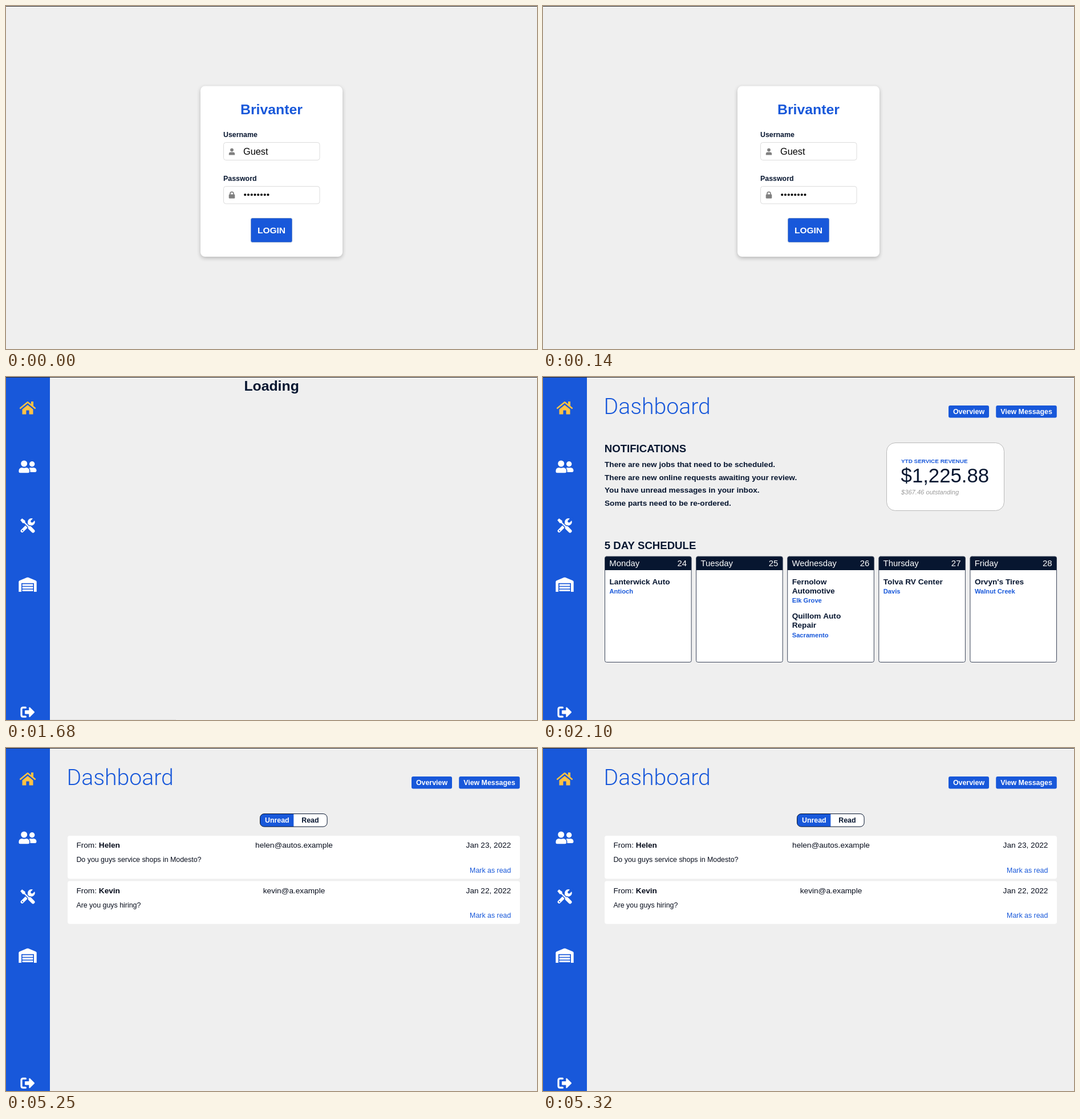
An HTML page with a canvas for the animation above (8000 ms loop, 931 by 602 pixels).

```html
<!DOCTYPE html>
<html lang="en">
<head>
<meta charset="utf-8">
<title>Service dashboard</title>
<style>
  html, body { margin: 0; width: 100%; height: 100%; overflow: hidden; background: #efefef; }
  canvas { display: block; width: 931px; height: 602px; }
</style>
</head>
<body>
<canvas id="stage" width="931" height="602"></canvas>
<script>
const ctx = document.getElementById('stage').getContext('2d');
const LOOP = 8000;
const BLUE = '#1858da', NAVY = '#071630', INK = '#070d1c', PAGE = '#efefef', GOLD = '#ffc244';
const SANS = '"Liberation Sans", Arial, sans-serif';

function text(str, x, y, size, { color = NAVY, style = 'bold', align = 'left', family = SANS } = {}) {
  ctx.font = `${style} ${size}px ${family}`;
  ctx.textAlign = align;
  ctx.fillStyle = color;
  ctx.fillText(str, x, y);
}

function box(x, y, w, h, r, fill, border) {
  ctx.beginPath();
  ctx.roundRect(x, y, w, h, r);
  if (fill) { ctx.fillStyle = fill; ctx.fill(); }
  if (border) { ctx.strokeStyle = border; ctx.lineWidth = 1; ctx.stroke(); }
}

function disc(x, y, r, fill) {
  ctx.beginPath();
  ctx.arc(x, y, r, 0, Math.PI * 2);
  ctx.fillStyle = fill;
  ctx.fill();
}

function shape(path, fill) {
  ctx.fillStyle = fill;
  ctx.fill(new Path2D(path));
}

function line(path, color, width, cap = 'round') {
  ctx.strokeStyle = color;
  ctx.lineWidth = width;
  ctx.lineCap = cap;
  ctx.lineJoin = 'round';
  ctx.stroke(new Path2D(path));
}

function topEdge() {
  ctx.fillStyle = '#2b2b2f';
  ctx.fillRect(0, 0, 931, 1);
}

// Sidebar icons
function house() {
  shape('M38 49 L47.5 56.7 V65.6 H40.6 V58.6 H35.4 V65.6 H28.5 V56.7 Z', GOLD);
  shape('M44 43 H48 V52 L44 49 Z', GOLD);
  line('M25.2 54.8 L38 44.3 L50.8 54.8', GOLD, 2.6);
}

function people() {
  disc(31.7, 152, 5.5, '#fff');
  shape('M28 159 Q31.7 160.6 35.4 159 Q41 159.4 41 165 V166 Q41 168.3 38.7 168.3 H24.7 Q22.4 168.3 22.4 166 V165 Q22.4 159.4 28 159 Z', '#fff');
  disc(45.7, 152.8, 4.7, '#fff');
  shape('M43.4 159 Q45.7 159.8 48 159 Q53.5 159.4 53.5 164.6 Q53.5 166.9 51.2 166.9 H42.5 Q43 162.6 40.6 159.8 Q42 159 43.4 159 Z', '#fff');
}

function tools() {
  line('M28.3 270.2 L40 258.5', '#fff', 5.4);
  disc(44.4, 254.4, 6.3, '#fff');
  line('M45.4 253.4 L52 246.8', BLUE, 4.6, 'butt');
  disc(45.6, 253.2, 2.3, BLUE);
  disc(29, 269.6, 1.2, BLUE);
  line('M31 254 L41 264', BLUE, 5, 'butt');
  line('M41.6 264.6 L47.4 270.4', BLUE, 8.6);
  shape('M25.2 251.2 L28.2 248.2 L33.6 252.3 V256.5 H29.4 Z', '#fff');
  line('M32 255 L41 264', '#fff', 2.4);
  line('M41.8 264.8 L47.4 270.4', '#fff', 6.2);
}

function warehouse() {
  shape('M22.3 377 V359.6 Q22.3 357.9 23.8 357.2 L37 351.8 Q38 351.5 39 351.8 L52.2 357.2 Q53.7 357.9 53.7 359.6 V377 Z', '#fff');
  ctx.fillStyle = BLUE;
  ctx.fillRect(27, 361.8, 22, 15.2);
  for (let i = 0; i < 3; i++) box(28.6, 363.6 + i * 4.7, 18.8, 3.1, 0.3, '#fff');
}

function signOut() {
  line('M34.4 580.2 H30 Q27 580.2 27 583.2 V593.2 Q27 596.2 30 596.2 H34.4', '#fff', 3.2);
  shape('M33 586 Q33 584.9 34.1 584.9 H40.3 V580.6 Q40.6 578.9 42 579.7 L49.8 587.4 Q50.4 588.2 49.8 589 L42 596.8 Q40.6 597.5 40.3 595.8 V591.5 H34.1 Q33 591.5 33 590.4 Z', '#fff');
}

function sidebar() {
  ctx.fillStyle = BLUE;
  ctx.fillRect(0, 0, 77, 602);
  house();
  people();
  tools();
  warehouse();
  signOut();
}

// Scenes
function login() {
  ctx.save();
  ctx.shadowColor = 'rgba(0,0,0,.24)';
  ctx.shadowBlur = 7;
  ctx.shadowOffsetY = 2.5;
  box(341, 140.5, 249, 299.5, 8, '#fff');
  ctx.restore();

  text('Brivanter', 465.5, 189.5, 24.8, { color: BLUE, align: 'center' });
  text('Username', 381, 230, 12.4);
  text('Password', 381, 307, 12.4);
  box(381.5, 239.5, 168.5, 31, 4, '#fff', '#dcdcdc');
  box(381.5, 316.5, 168.5, 30.5, 4, '#fff', '#dcdcdc');

  const grey = '#808080';
  disc(396, 252.6, 2.9, grey);
  shape('M390.8 261.5 V259.8 Q390.8 256.6 394 256.6 H398 Q401.2 256.6 401.2 259.8 V261.5 Z', grey);
  box(390.7, 330.6, 10.6, 7.2, 1.4, grey);
  line('M393 331 V329.3 A3 3 0 0 1 399 329.3 V331', grey, 1.7, 'butt');

  text('Guest', 416, 261, 16.3, { color: '#000', style: 'normal' });
  for (let i = 0; i < 8; i++) disc(419.2 + i * 5.75, 331.2, 2, '#000');

  box(429.5, 372.5, 72, 42, 2.5, BLUE, '#6f8fc8');
  text('LOGIN', 465.5, 398.5, 15.5, { color: '#fff', align: 'center' });
}

function loading() {
  sidebar();
  text('Loading', 465.6, 24.3, 24.8, { align: 'center' });
  ctx.fillStyle = '#dedede';
  ctx.fillRect(77, 601, 221, 1);
}

function header() {
  sidebar();
  text('Dashboard', 106.5, 64.5, 39.2, { color: BLUE, style: '300', family: 'Roboto, sans-serif' });
  const button = (label, x, w) => {
    box(x, 50, w, 21.6, 3, BLUE);
    text(label, x + w / 2, 64.5, 12.4, { color: '#fff', align: 'center' });
  };
  button('Overview', 711, 71);
  button('View Messages', 794.2, 106.6);
}

const NOTICES = [
  'There are new jobs that need to be scheduled.',
  'There are new online requests awaiting your review.',
  'You have unread messages in your inbox.',
  'Some parts need to be re-ordered.'
];

const DAYS = [
  { name: 'Monday', jobs: [{ shop: ['Lanterwick Auto'], city: 'Antioch' }] },
  { name: 'Tuesday', jobs: [] },
  { name: 'Wednesday', jobs: [
    { shop: ['Fernolow', 'Automotive'], city: 'Elk Grove' },
    { shop: ['Quillom Auto', 'Repair'], city: 'Sacramento' }
  ] },
  { name: 'Thursday', jobs: [{ shop: ['Tolva RV Center'], city: 'Davis' }] },
  { name: 'Friday', jobs: [{ shop: ["Orvyn's Tires"], city: 'Walnut Creek' }] }
];

function dayColumn(day, i) {
  const x = 108.5 + i * 160.1, w = 151.6;
  box(x, 315, w, 185.5, 3, '#fff');
  box(x, 315, w, 24, [3, 3, 0, 0], NAVY);
  box(x, 315, w, 185.5, 3, null, '#3c465a');
  text(day.name, x + 7.8, 332.3, 14.88, { color: '#fff', style: 'normal' });
  text(String(24 + i), x + w - 8, 332.3, 14.88, { color: '#fff', style: 'normal', align: 'right' });
  let y = 363.6;
  for (const job of day.jobs) {
    for (const part of job.shop) {
      text(part, x + 8, y, 13.64);
      y += 16.4;
    }
    text(job.city, x + 8, y, 11.16, { color: BLUE });
    y += 27.6;
  }
}

function overview() {
  header();
  text('NOTIFICATIONS', 107.8, 131.8, 18.6);
  NOTICES.forEach((notice, i) => text(notice, 108, 158.2 + i * 22.45, 13.64));

  box(602.5, 115.5, 206, 119, 15, '#fff', '#b9b9b9');
  text('YTD SERVICE REVENUE', 628, 150.5, 9.92, { color: BLUE });
  text('$1,225.88', 627.6, 185, 34.72, { style: 'normal' });
  text('$367.46 outstanding', 628, 206.3, 11.16, { color: '#9a9a9a', style: 'italic' });

  text('5 DAY SCHEDULE', 107.8, 302, 18.6);
  DAYS.forEach(dayColumn);
}

function message(y, h, { name, mail, date, body }) {
  const plain = { color: INK, style: 'normal' };
  const right = { ...plain, align: 'right' };
  box(108, y, 793, h, 4, '#fff');
  text('From: ', 123.4, y + 21, 13.64, plain);
  text(name, 162.8, y + 21, 13.64, { color: INK });
  text(mail, 505, y + 21, 13.64, { ...plain, align: 'center' });
  text(date, 885.4, y + 21, 13.64, right);
  text(body, 123.4, y + 46.4, 12.4, plain);
  text('Mark as read', 885.4, y + h - 10.6, 12.4, { ...right, color: BLUE });
}

function messages() {
  header();
  box(445.5, 115.5, 117.6, 22.6, 7, '#fff');
  box(445.5, 115.5, 58.8, 22.6, [7, 0, 0, 7], BLUE);
  box(445.5, 115.5, 117.6, 22.6, 7, null, NAVY);
  text('Unread', 475.3, 131.2, 12.4, { color: '#fff', align: 'center' });
  text('Read', 533.4, 131.2, 12.4, { align: 'center' });

  message(154, 75.6, {
    name: 'Helen', mail: 'helen@autos.example', date: 'Jan 23, 2022',
    body: 'Do you guys service shops in Modesto?'
  });
  message(233.5, 75.2, {
    name: 'Kevin', mail: 'kevin@a.example', date: 'Jan 22, 2022',
    body: 'Are you guys hiring?'
  });
}

const SCENES = [[5250, messages], [2100, overview], [1680, loading], [0, login]];

function frame(now) {
  const t = now % LOOP;
  ctx.fillStyle = PAGE;
  ctx.fillRect(0, 0, 931, 602);
  SCENES.find(([start]) => t >= start)[1]();
  topEdge();
  requestAnimationFrame(() => frame(performance.now() - begin));
}

const begin = performance.now();
frame(0);
</script>
</body>
</html>
```
